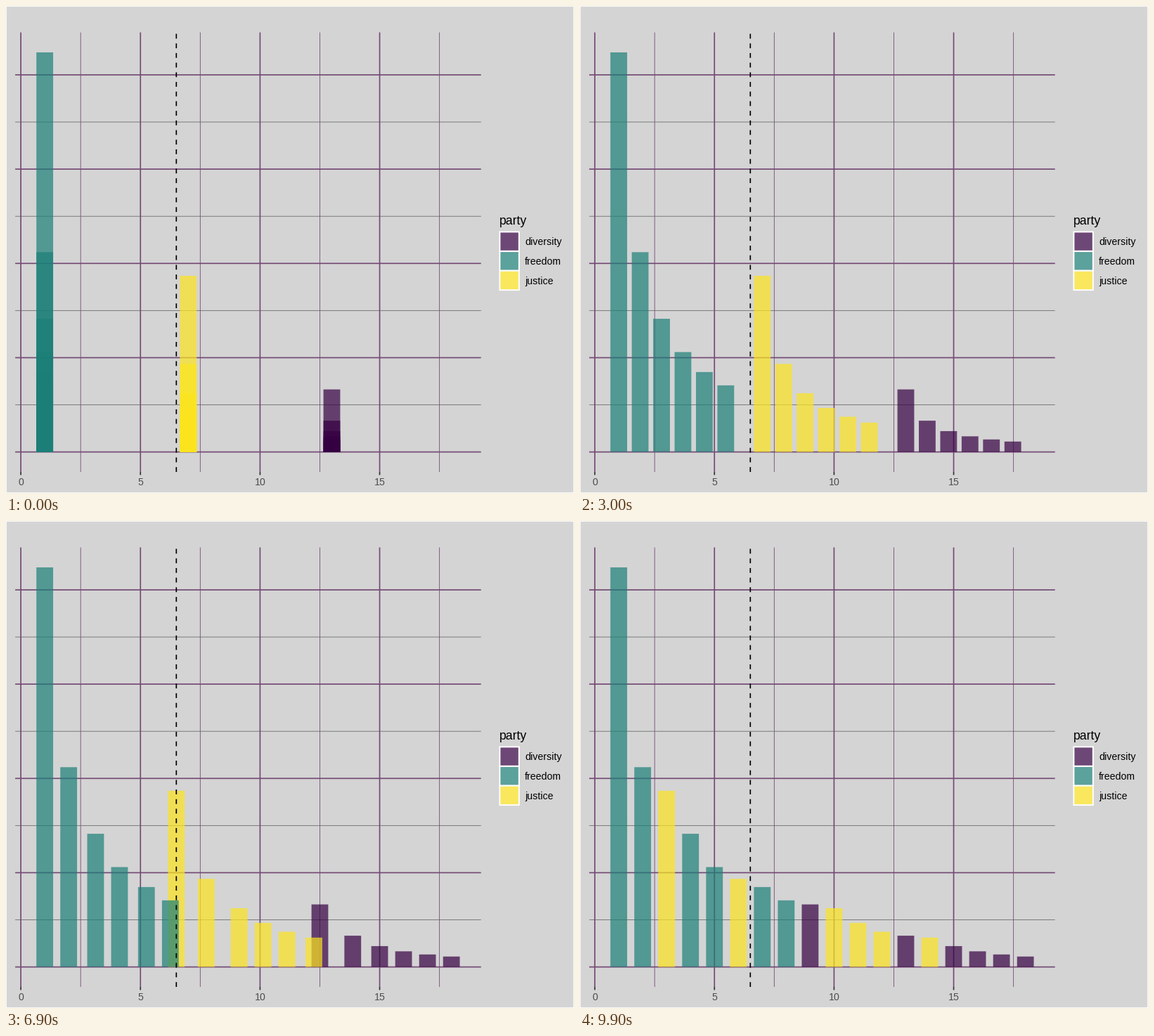
Recreate the animation shown at these times as a matplotlib script. Size 808 by 693 pixels, loop 10 s.

```python
import numpy as np
import matplotlib.pyplot as plt
from matplotlib.animation import FuncAnimation
from matplotlib.patches import Rectangle

W, H, DPI = 808, 693, 100
PX = 72 / DPI                      # points per pixel
FRAMES, MID = 100, 49              # second layout is reached at MID

plt.rcParams["font.family"] = "Liberation Sans"

X0, UNIT = 21.1, 34.03             # x axis in pixels
BASE, STEP = 634.6, 134.15         # baseline and major grid spacing
LEFT, RIGHT, TOP, BOTTOM = 13.1, 675.7, 37.6, 663.0
BAR_W = 0.7
THICK, THIN = 1.7, 0.85

BG, KEY_BG = "#d4d4d4", "#f2f2f2"
GRID, GRID_MINOR = "#744a74", "#6c6c6c"
ALPHA = 0.7

# name, colour, height of the tallest bar, first slot (in drawing order)
PARTIES = [
    ("diversity", "#350042", 89.0, 13),
    ("justice", "#fce51e", 250.7, 7),
    ("freedom", "#1b7f78", 568.6, 1),
]
SEATS = 6

fig = plt.figure(figsize=(W / DPI, H / DPI), dpi=DPI, facecolor=BG)
ax = fig.add_axes([0, 0, 1, 1])
ax.set_xlim(0, W)
ax.set_ylim(H, 0)
ax.axis("off")


def px(x):
    return X0 + UNIT * x


def line(xs, ys, color, width, z=1, **kw):
    ax.plot(xs, ys, color=color, lw=width * PX, zorder=z, snap=False,
            solid_capstyle="butt", **kw)


def rect(x, y, w, h, z, **kw):
    return ax.add_patch(Rectangle((x, y), w, h, zorder=z, snap=False, **kw))


def label(x, y, s, size, color="black", ha="left"):
    ax.text(x, y, s, fontsize=size * PX, color=color, ha=ha, va="baseline")


def draw_grid():
    for i in range(4):
        y = BASE - STEP * (i + 0.5)
        line([LEFT, RIGHT], [y, y], GRID_MINOR, THIN)
        x = px(5 * i + 2.5)
        line([x, x], [TOP, BOTTOM], GRID, THIN)
    for i in range(5):
        y = BASE - STEP * i
        line([LEFT, RIGHT], [y, y], GRID, THICK)
    for v in range(0, 20, 5):
        x = px(v)
        line([x, x], [TOP, BOTTOM], GRID, THICK)
        line([x, x], [BOTTOM, BOTTOM + 4.4], "#333333", THICK)
        label(x, 682, str(v), 14.08, "#4d4d4d", "center")


def draw_legend():
    size, x, y = 27.65, 702.3, 321.3
    label(x - 0.3, 310.8, "party", 17.6)
    for i, (name, color, _, _) in enumerate(sorted(PARTIES)):
        ky = y + i * size
        rect(x, ky, size, size, 2, fc=KEY_BG, ec="white", lw=THICK * PX)
        rect(x + 1.13, ky + 1.13, size - 2.26, size - 2.26, 3,
             fc=color, ec="none", alpha=ALPHA)
        label(738.2, ky + size / 2 + 5.2, name, 14.08)


def ease(t):
    """Exponential in-out."""
    if t <= 0 or t >= 1:
        return float(t >= 1)
    if t < 0.5:
        return 0.5 * 2 ** (20 * t - 10)
    return 1 - 0.5 * 2 ** (10 - 20 * t)


draw_grid()
draw_legend()
rect(0, 0, W, H, 9, fc="none", ec="white", lw=THICK * PX)
line([px(6.5)] * 2, [BOTTOM, TOP], "black", THICK, 6,
     linestyle=(0, (4.03, 4.03)), dash_capstyle="butt")

# The three layouts: stacked, side by side, ranked by height
divisors = np.arange(1, SEATS + 1)
heights = np.concatenate([top / divisors for _, _, top, _ in PARTIES])
stacked = np.repeat([float(first) for *_, first in PARTIES], SEATS)
spread = stacked + np.tile(divisors - 1, len(PARTIES))
ranked = np.empty(len(heights))
ranked[np.argsort(-heights)] = np.arange(1, len(heights) + 1)

bars = [
    rect(0, BASE - h, BAR_W * UNIT, h, 4 + i / 100, ec="none",
         fc=PARTIES[i // SEATS][1], alpha=ALPHA)
    for i, h in enumerate(heights)
]


def update(k):
    if k <= MID:
        slots = stacked + (spread - stacked) * ease(k / MID)
    else:
        t = (k - MID) / (FRAMES - 1 - MID)
        slots = spread + (ranked - spread) * ease(t)
    for bar, slot in zip(bars, slots):
        bar.set_x(px(slot - BAR_W / 2))
    return bars


anim = FuncAnimation(fig, update, frames=FRAMES, interval=100,
                     repeat=True, repeat_delay=0)
plt.show()
```
